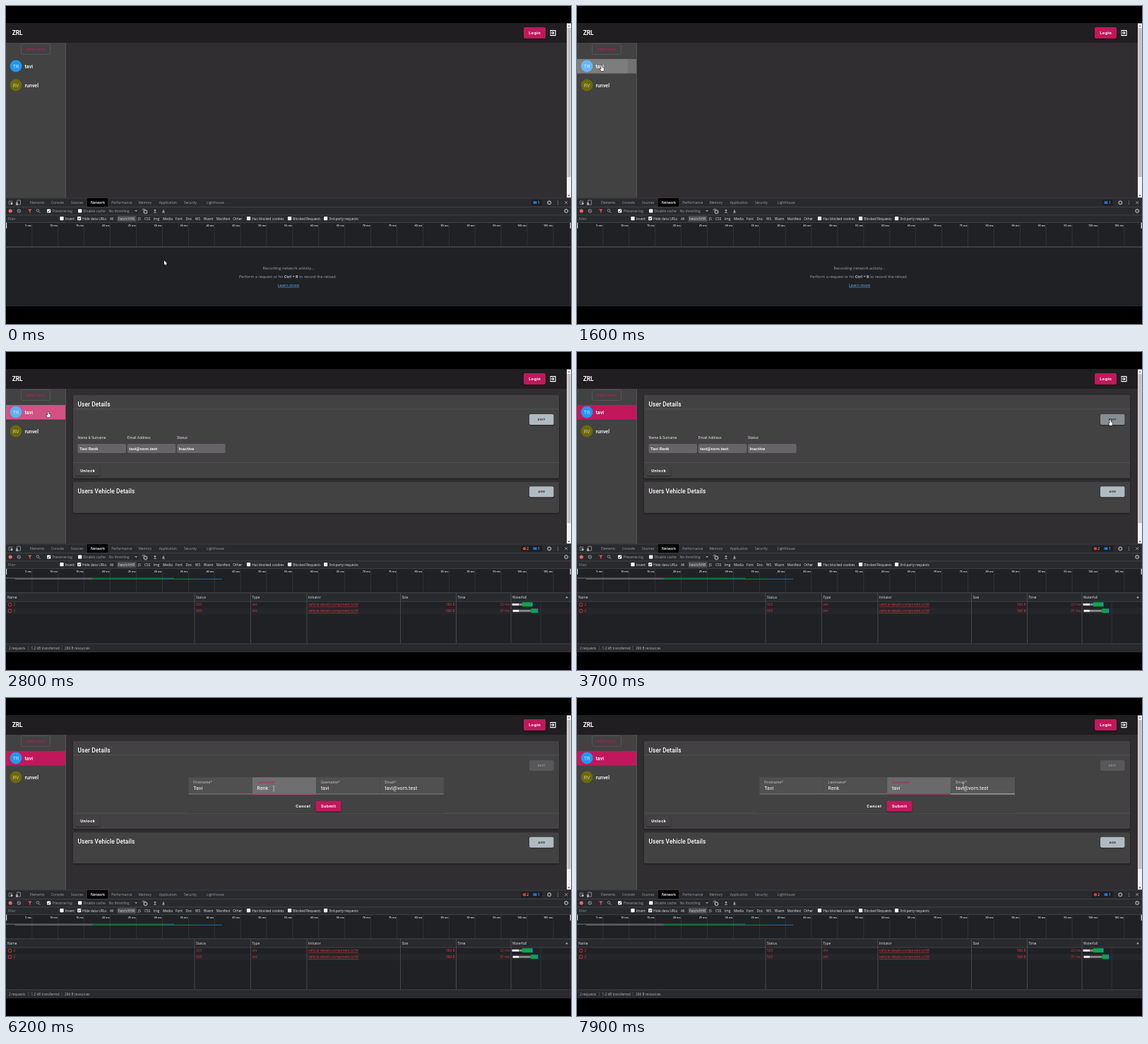
An HTML page with a canvas for the animation above (8 s loop, 800 px wide and 450 px high).

```html
<!DOCTYPE html>
<html lang="en">
<head>
<meta charset="utf-8">
<title>User admin</title>
<style>
html, body { margin: 0; height: 100%; overflow: hidden; background: #000; }
canvas { display: block; width: 100vw; height: 100vh; }
</style>
</head>
<body>
<canvas id="stage" width="800" height="450"></canvas>
<script>
const ctx = document.getElementById('stage').getContext('2d');
const LOOP = 8000, STEP = 100;
const PINK = '#c2185b', CARD = '#424242', GREY = '#9aa0a6', LIGHT = '#e2e4e7', RED = '#d93a40', BLUE = '#1a73e8';
const USER = { first: 'Tavi', last: 'Renk', login: 'tavi', mail: 'tavi@vorn.test' };
const OPEN_DETAILS = 1700, EDIT_CLICK = 3700, OPEN_FORM = 3800;

// Pointer path: time, x, y
const PATH = [
  [0, 224, 360], [200, 190, 186], [400, 190, 186], [1100, 35, 84], [2700, 35, 84],
  [3600, 755, 96], [4000, 755, 96], [4500, 318, 130], [4600, 318, 130], [4900, 304, 124],
  [5600, 304, 124], [6000, 379, 128], [6400, 379, 128], [6800, 458, 128], [7500, 458, 128], [7900, 547, 124]
];
// Moments at which the form fields take focus
const FOCUS = [5300, 6000, 6700];

const clamp = v => Math.max(0, Math.min(1, v));

function rect(x, y, w, h, color, radius = 0) {
  ctx.fillStyle = color;
  ctx.beginPath();
  ctx.roundRect(x, y, w, h, radius);
  ctx.fill();
}

function frame(x, y, w, h, color, radius = 0, width = 1) {
  ctx.strokeStyle = color;
  ctx.lineWidth = width;
  ctx.beginPath();
  ctx.roundRect(x, y, w, h, radius);
  ctx.stroke();
}

function disc(x, y, r, color) {
  ctx.fillStyle = color;
  ctx.beginPath();
  ctx.arc(x, y, r, 0, 7);
  ctx.fill();
}

function ring(x, y, r, color, width = 1) {
  ctx.strokeStyle = color;
  ctx.lineWidth = width;
  ctx.beginPath();
  ctx.arc(x, y, r, 0, 7);
  ctx.stroke();
}

function line(color, width, ...points) {
  ctx.strokeStyle = color;
  ctx.lineWidth = width;
  ctx.beginPath();
  points.forEach(([x, y]) => ctx.lineTo(x, y));
  ctx.stroke();
}

function shape(points, fill, stroke) {
  ctx.beginPath();
  points.forEach(([x, y]) => ctx.lineTo(x, y));
  ctx.closePath();
  if (stroke) {
    ctx.strokeStyle = stroke;
    ctx.lineWidth = 1;
    ctx.stroke();
  }
  ctx.fillStyle = fill;
  ctx.fill();
}

// y is the middle of the capital letters
function text(str, x, y, size, color, { weight = 500, align = 'left', spacing = 0, family = 'Roboto' } = {}) {
  ctx.font = `${weight} ${size}px ${family}, sans-serif`;
  ctx.letterSpacing = spacing + 'px';
  ctx.textAlign = align;
  ctx.fillStyle = color;
  ctx.fillText(str, x, y + size * 0.36);
  return ctx.measureText(str).width;
}

const tool = (str, x, y, color = GREY, options = {}, size = 4.8) =>
  text(str, x, y, size, color, { weight: 400, family: '"Open Sans"', ...options });

function button(label, x, y, w, h, fill, color, size = 5.83) {
  ctx.save();
  ctx.shadowColor = 'rgba(0,0,0,.45)';
  ctx.shadowBlur = 2;
  ctx.shadowOffsetY = 1;
  rect(x, y, w, h, fill, 2);
  ctx.restore();
  text(label, x + w / 2 + 0.25, y + h / 2, size, color, { weight: 700, align: 'center', spacing: 0.5 });
}

function card(title, y, h) {
  ctx.save();
  ctx.shadowColor = 'rgba(0,0,0,.5)';
  ctx.shadowBlur = 2;
  ctx.shadowOffsetY = 1;
  rect(95, y, 688, h, CARD, 2);
  ctx.restore();
  text(title, 101.5, y + 13.2, 8.33, '#fff', { spacing: 0.1 });
}

function sidebar(t, pointer) {
  rect(0, 52, 84, 220, CARD);
  rect(84, 52, 1, 220, '#545254');
  frame(21.5, 53.5, 41, 15, '#555', 2);
  text('Add user', 42, 61.3, 5.9, PINK, { align: 'center', spacing: 0.5 });

  if (t >= OPEN_DETAILS) rect(0, 75, 84, 20.5, PINK);
  const rows = [[85, 'TR', USER.login, '#2196f3', '#c5e4fc'], [112, 'RV', 'runvel', '#6c690c', '#cfcd97']];
  for (const [y, initials, name, fill, color] of rows) {
    disc(14, y, 8.4, fill);
    text(initials, 14, y, 7, color, { weight: 400, align: 'center' });
    text(name, 26.5, y, 7.1, '#fff');
  }
  const hovered = pointer.x < 84 && pointer.y > 75 && pointer.y < 96;
  const focused = t >= 1600 && t < EDIT_CLICK;
  if (hovered || focused) rect(0, 75, 84, 20.5, 'rgba(255,255,255,.25)');
  if (t >= 1600 && t < 2100) {
    const alpha = 0.08 * (1 - (t - 1600) / 500);
    rect(0, 75, t < 1700 ? 72 : 84, 20.5, `rgba(255,255,255,${alpha})`, [0, 3, 3, 0]);
  }
}

function field(i, t, pointer) {
  const label = ['Firstname*', 'Lastname*', 'Username*', 'Email*'][i];
  const value = [USER.first, USER.last, USER.login, USER.mail][i];
  const x = 258.5 + 90.35 * i, w = 90.35;
  const hovered = pointer.x >= x && pointer.x < x + w && pointer.y > 112 && pointer.y < 137;
  const active = t >= FOCUS[i] && !(t >= FOCUS[i + 1]);
  const amount = active ? clamp((t - FOCUS[i] + 100) / 300) : 0;

  rect(x, 112.3, w, 24, hovered ? '#565657' : '#505051');
  rect(x, 112.3, w, 24, `rgba(255,255,255,${0.15 * amount})`);
  rect(x, 135.5, w, 0.8, hovered ? '#e8e8e8' : '#8c8c8c');
  rect(x + w / 2 * (1 - amount), 135.2, w * amount, 1.1, PINK);
  text(label, x + 6.7, 118.7, 5, active ? PINK : '#c0c0c0', { weight: 400, spacing: 0.2 });
  text(value, x + 6.7, 127.4, 7, '#fff', { weight: 400, spacing: 0.1 });
}

function details(t, pointer) {
  const editing = t >= OPEN_FORM;
  const shift = editing ? 6.5 : 0;
  card('User Details', 60.8, 118 + shift);
  rect(95, 80.5, 688, 0.8, '#565656');
  rect(95, 156.2 + shift, 688, 0.8, '#565656');
  button('Unlock', 98, 160.5 + shift, 35, 14.5, CARD, '#fff');

  if (editing) {
    rect(741, 88, 34.5, 15, '#58585a', 2);
    text('EDIT', 758.2, 95.6, 4.3, '#98989a', { weight: 700, align: 'center', spacing: 0.5 });
    rect(255, 161.8, 366, 0.7, '#383838');
    for (let i = 0; i < 4; i++) field(i, t, pointer);
    text('Cancel', 410.3, 153, 5.83, '#fff', { weight: 700, spacing: 0.5 });
    button('Submit', 438.5, 145.5, 36, 15, PINK, '#fff');
  } else {
    button('EDIT', 741, 88, 34.5, 15, t >= EDIT_CLICK ? '#868d93' : '#b0bac1', '#25282b', 4.3);
    const entries = [['Name & Surname', USER.first + ' ' + USER.last], ['Email Address', USER.mail], ['Status', 'Inactive']];
    entries.forEach(([label, value], i) => {
      const x = 101.5 + 70.3 * i;
      text(label, x, 120.7, 5.15, '#dedede', { weight: 400 });
      rect(x, 130, 68.5, 13, '#676467', 2);
      text(value, x + 2.5, 136.4, 6.2, '#fff');
    });
  }

  card('Users Vehicle Details', 183.8 + shift, 44);
  button('ADD', 741, 190.3 + shift, 34.5, 15, '#b0bac1', '#25282b', 4.3);
}

function page(t, pointer) {
  rect(0, 24.5, 794, 247, '#302e31');
  rect(0, 24.5, 794, 27.5, '#201e20');
  text('ZRL', 8.7, 38.3, 8.33, '#fff', { weight: 700 });
  button('Login', 733, 30, 31, 16, PINK, '#fff');
  line('#fff', 1.1, [771, 36.5], [771, 34.6], [778, 34.6], [778, 41.6], [771, 41.6], [771, 39.7]);
  line('#fff', 1.1, [770, 38.1], [775.5, 38.1]);
  line('#fff', 1.1, [773.8, 36.1], [775.8, 38.1], [773.8, 40.1]);
  sidebar(t, pointer);
  if (t >= OPEN_DETAILS) details(t, pointer);

  rect(794, 24.5, 6, 247, '#f1f1f1');
  rect(794.6, 31, 5, 211, '#c1c1c1');
  shape([[795.4, 29], [798.6, 29], [797, 27]], '#777');
  shape([[795.4, 267.5], [798.6, 267.5], [797, 269.5]], '#444');
}

function checkbox(x, y, checked) {
  rect(x - 2.6, y - 2.6, 5.2, 5.2, '#fff', 0.8);
  if (checked) line('#333', 0.9, [x - 1.6, y], [x - 0.5, y + 1.3], [x + 1.7, y - 1.4]);
}

function gear(x, y) {
  ring(x, y, 2.1, GREY, 1.2);
  ctx.setLineDash([1, 1.2]);
  ring(x, y, 2.9, GREY, 0.9);
  ctx.setLineDash([]);
}

function arrow(x, dir) {
  line(GREY, 1, [x, 290 - 2 * dir], [x, 290 + 1.5 * dir]);
  shape([[x - 2, 290], [x + 2, 290], [x, 290 + 2.3 * dir]].map(([a, b]) => [a, b - (dir < 0 ? 0.2 : 0)]), GREY);
  line(GREY, 0.8, [x - 2, 292.6], [x + 2, 292.6]);
}

function toolbars(t) {
  rect(0, 271.5, 800, 35, '#292a2d');
  for (const y of [271.5, 284, 295.5, 306]) rect(0, y, 800, 0.7, '#46484c');

  frame(4, 276, 4.6, 4.6, GREY, 0, 0.7);
  shape([[6, 277.5], [10, 279.2], [8, 281.5]], '#c4c7ca');
  frame(15.5, 275, 5, 6, GREY, 0.5, 0.8);
  rect(14, 278, 3, 4, GREY);
  rect(115, 272, 29, 12, '#000');
  const tabs = [['Elements', 34], ['Console', 64], ['Sources', 92], ['Network', 120], ['Performance', 149.3],
    ['Memory', 187.5], ['Application', 216.7], ['Security', 252], ['Lighthouse', 284]];
  for (const [name, x] of tabs) tool(name, x, 278.4, name === 'Network' ? '#fff' : GREY, { weight: name === 'Network' ? 600 : 400 });

  const errors = t >= 1800;
  rect(errors ? 729 : 743.5, 274, errors ? 30 : 15, 8.5, '#1d1e20', 1);
  if (errors) {
    disc(734, 278.2, 2.3, '#e8353b');
    tool('2', 737.3, 278.4, LIGHT);
  }
  rect(746.5, 276.2, 5, 3.8, BLUE, 0.6);
  tool('1', 753, 278.4, LIGHT);
  gear(769.3, 278.3);
  for (const y of [276, 278.3, 280.6]) disc(781.5, y, 0.6, GREY);
  line(GREY, 0.9, [791.2, 276.2], [795.2, 280.2]);
  line(GREY, 0.9, [795.2, 276.2], [791.2, 280.2]);

  disc(6.2, 290, 2.6, '#e46962');
  ring(18.3, 290, 2.3, GREY, 0.9);
  line(GREY, 0.9, [16.7, 288.4], [19.9, 291.6]);
  shape([[31, 287.5], [36.6, 287.5], [34.5, 290], [34.5, 293], [33.1, 292], [33.1, 290]], '#d94f50');
  ring(45, 289.4, 1.8, GREY, 0.8);
  line(GREY, 0.9, [46.4, 290.8], [48.4, 292.8]);
  checkbox(60.7, 290, true);
  tool('Preserve log', 66, 290, GREY, {}, 4.9);
  checkbox(104.7, 290);
  tool('Disable cache', 109.5, 290, GREY, {}, 4.9);
  tool('No throttling', 145.5, 290, GREY, {}, 4.9);
  shape([[182.3, 289], [186, 289], [184.2, 291.3]], GREY);
  for (const r of [1.5, 3.2]) {
    ctx.beginPath();
    ctx.strokeStyle = GREY;
    ctx.arc(195, 290.4, r, -2.5, -0.6);
    ctx.stroke();
  }
  gear(197.5, 291.3);
  arrow(211, -1);
  arrow(223, 1);
  gear(793.2, 290);

  tool('Filter', 2.5, 301, '#888c91', {}, 4.8);
  rect(157.5, 297, 27, 8, '#4a4c50', 1.5);
  const filters = [['Invert', 84], ['Hide data URLs', 108.3], ['All', 147], ['Fetch/XHR', 159], ['JS', 187], ['CSS', 196],
    ['Img', 209], ['Media', 222], ['Font', 240], ['Doc', 254.5], ['WS', 268], ['Wasm', 279.8], ['Manifest', 297.7],
    ['Other', 321.3], ['Has blocked cookies', 348.3], ['Blocked Requests', 406.3], ['3rd-party requests', 457.3]];
  for (const [name, x] of filters) tool(name, x, 300.8, LIGHT, { weight: 500 });
  [79, 103.7, 343.5, 401.6, 452.6].forEach((x, i) => checkbox(x, 300.6, i === 1));
}

function overview(t) {
  for (let i = 1; i < 22; i++) {
    const x = 36.9 * i;
    rect(x - 0.4, 306.5, 0.8, 34.5, '#36383b');
    tool(`${i * 5} ms`, x - 1, 310.6, LIGHT, { weight: 600, align: 'right' }, 3.8);
  }
  rect(0, 306.7, 1.2, 8, '#c9cbce');
  rect(798.6, 306.7, 1.4, 8, '#c9cbce');
  if (t >= OPEN_DETAILS) {
    rect(0, 319.6, 122, 1, '#77797b');
    rect(122, 319.6, 100, 1, '#0c8f45');
    rect(222, 319.6, 16, 1, '#27719e');
    rect(13, 320.8, 110, 1, '#77797b');
    rect(123, 320.8, 147, 1, '#0c8f45');
    rect(270, 320.8, 36, 1, '#206ca0');
  }
  rect(0, 340.5, 800, 0.9, '#5c5e62');
}

function requests() {
  const columns = [['Name', 0], ['Status', 267], ['Type', 346.5], ['Initiator', 426], ['Size', 558.5], ['Time', 637.5], ['Waterfall', 715]];
  rect(0, 341.3, 800, 11.7, '#292a2d');
  rect(0, 352.7, 800, 0.7, '#46484c');
  rect(0, 362, 800, 9, '#25262a');
  for (const [name, x] of columns) {
    if (x) rect(x - 0.4, 341.3, 0.8, 71.5, '#505257');
    tool(name, x + 2, 347.3, LIGHT, { weight: 500 });
  }
  shape([[792, 348.3], [796, 348.3], [794, 345.5]], GREY);
  rect(756.8, 353, 0.6, 60, '#3a3c40');

  for (const [y, time] of [[357.5, '22 ms'], [366.4, '31 ms']]) {
    frame(3.4, y - 2.1, 4.2, 4.2, RED, 0.5, 0.8);
    tool('2', 10.5, y, RED);
    tool('503', 269, y, RED);
    tool('xhr', 348.5, y, RED);
    const width = tool('vehicle-details.component.ts:54', 428, y, RED);
    rect(428, y + 2.6, width, 0.5, RED);
    tool('586 B', 635.5, y, RED, { align: 'right' });
    tool(time, 713, y, RED, { align: 'right' });
  }
  rect(716.5, 355.8, 9.5, 3, '#f2f2f2');
  rect(726, 355.8, 5, 3, '#8a8a8a');
  rect(731, 354.2, 13, 6, '#0aa74c');
  rect(744, 354.2, 1.5, 6, '#2196d6');
  rect(717.5, 364.8, 8.5, 3, '#f2f2f2');
  rect(726, 364.8, 17, 3, '#8a8a8a');
  rect(743.3, 363.2, 8.2, 6, '#0aa74c');
  rect(751.5, 363.2, 1.7, 6, '#2196d6');

  rect(0, 412.6, 800, 12.4, '#292a2d');
  rect(0, 412.6, 800, 0.7, '#46484c');
  [['2 requests', 4], ['1.2 kB transferred', 35.5], ['286 B resources', 83]].forEach(([label, x], i) => {
    tool(label, x, 419, '#b4b8bc');
    if (i) rect(x - 4.3, 416, 0.6, 6, '#5c5e62');
  });
}

function emptyLog() {
  const color = '#a0a3a8';
  tool('Recording network activity...', 400, 371, color, { align: 'center' }, 5.6);
  let x = 330;
  for (const [part, weight] of [['Perform a request or hit ', 400], ['Ctrl + R', 700], [' to record the reload.', 400]])
    x += tool(part, x, 382.8, weight > 400 ? '#c4c7ca' : color, { weight }, 5.55);
  const width = tool('Learn more', 400, 394.7, '#5cabe8', { align: 'center' }, 5.6);
  rect(400 - width / 2, 397.7, width, 0.6, '#5cabe8');
}

function pointerAt(t) {
  const i = PATH.findIndex(key => key[0] > t);
  if (i < 0) return { x: 547, y: 124 };
  const [t0, x0, y0] = PATH[i - 1], [t1, x1, y1] = PATH[i];
  const p = (t - t0) / (t1 - t0), eased = p * p * (3 - 2 * p);
  return { x: x0 + (x1 - x0) * eased, y: y0 + (y1 - y0) * eased };
}

function drawPointer(t, { x, y }) {
  const overField = t >= OPEN_FORM && x > 258 && x < 620 && y > 112 && y < 137;
  const overRow = x < 84 && y > 75 && y < 96;
  const overEdit = t < OPEN_FORM && x > 741 && x < 776 && y > 88 && y < 104;
  ctx.save();
  ctx.translate(x, y);
  if (overField) {
    line('#c8c8c8', 0.7, [0, -3.2], [0, 3.2]);
    for (const end of [-3.4, 3.4]) line('#c8c8c8', 0.6, [-1.3, end], [1.3, end]);
  } else if (overRow || overEdit) {
    shape([[-0.6, 0], [0.6, 0], [0.9, 3], [3.4, 3.9], [3.2, 6.4], [2.4, 8], [-0.7, 8], [-2.7, 4.8], [-2, 4.4], [-0.7, 5.4]], '#fff', '#000');
  } else {
    shape([[0, 0], [0, 6.4], [1.4, 5.1], [2.4, 7.2], [3.3, 6.8], [2.4, 4.8], [4.2, 4.6]], '#fff', '#000');
  }
  ctx.restore();
}

function draw(now) {
  const t = Math.floor(now % LOOP / STEP) * STEP;
  const pointer = pointerAt(t);
  rect(0, 0, 800, 450, '#000');
  page(t, pointer);
  rect(0, 271.5, 800, 153.5, '#202124');
  toolbars(t);
  overview(t);
  t >= OPEN_DETAILS ? requests() : emptyLog();
  drawPointer(t, pointer);
}

const start = performance.now();
function tick() {
  draw(performance.now() - start);
  requestAnimationFrame(tick);
}
tick();
</script>
</body>
</html>
```
